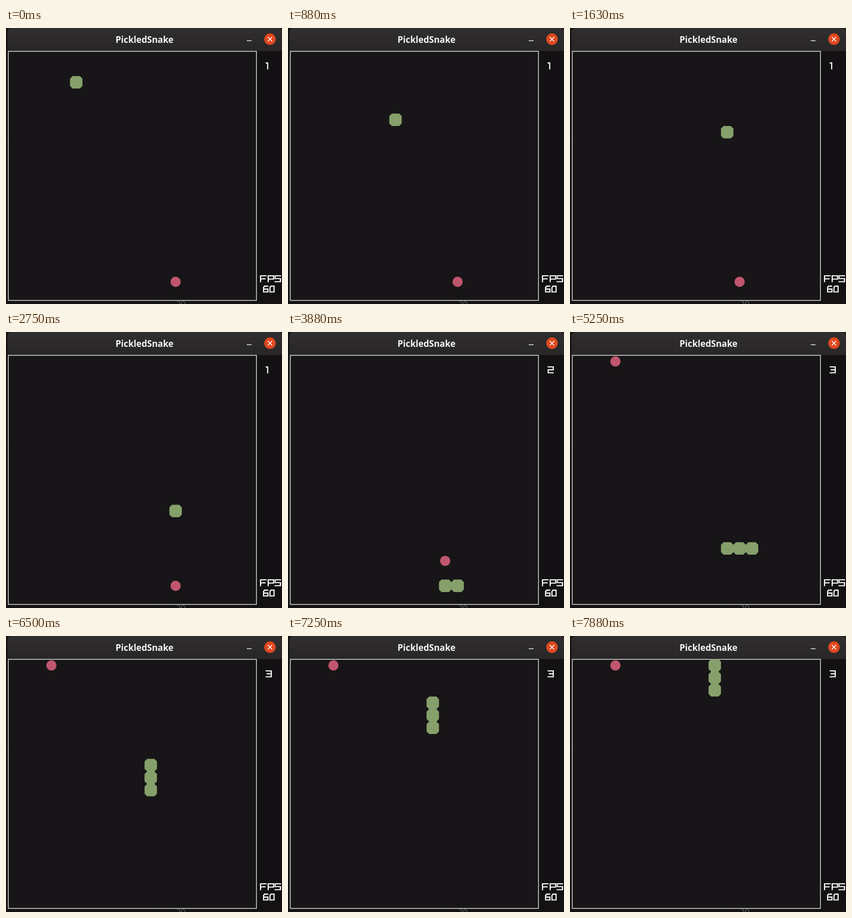
An HTML page that plays this animation: 540x538 px, repeating every 8000 ms.

```html
<!DOCTYPE html>
<html lang="en">
<head>
<meta charset="utf-8">
<title>PickledSnake</title>
<style>
  html, body { margin: 0; width: 100%; height: 100%; overflow: hidden; background: #151315; }
  svg { display: block; width: 100%; height: 100%; }
  text { font-family: "Open Sans", "Noto Sans", sans-serif; }
  .pixel { fill: none; stroke: #fff; stroke-width: 2.2; stroke-linecap: square; }
</style>
</head>
<body>
<svg viewBox="0 0 540 538">
  <defs>
    <linearGradient id="bar" x2="0" y2="1">
      <stop stop-color="#302e2f"/>
      <stop offset="1" stop-color="#282627"/>
    </linearGradient>
  </defs>
  <rect width="540" height="538" fill="#151214"/>
  <text x="-5" y="222" font-size="13" fill="#5b5747">s</text>
  <text x="333" y="544" font-size="16" fill="#5c5a5c">20</text>
  <path d="M300 532V538" stroke="#262326"/>
  <path d="M3 45V8Q3 0 11 0H532Q540 0 540 8V45Z" fill="url(#bar)"/>
  <rect x="490" y="45" width="50" height="487" fill="#131114"/>
  <rect x="4.5" y="45.5" width="485.5" height="485.5" fill="#171517" stroke="#f4f4f4" stroke-width="1.3"/>
  <text x="271" y="28.7" font-size="17.2" font-weight="700" text-anchor="middle" fill="#f5f5f3">PickledSnake</text>
  <path d="M471 24.7H480.5" stroke="#eee" stroke-width="1.4"/>
  <circle cx="516.5" cy="21.8" r="11.2" fill="#e0481f"/>
  <path d="M512.3 17.6l8.4 8.4m0-8.4l-8.4 8.4" stroke="#fff" stroke-width="1.5"/>
  <circle id="apple" r="10" fill="#bf566e"/>
  <path id="snake" fill="#86a06b"/>
  <path id="score" class="pixel"/>
  <path class="pixel" d="M498 494.5V483H509M498 489H507
    M513 494.5V483H523.5V489.5H513 M537 483H526.5V488.5H537V494.5H526.5
    M512 503.2H506L504 505.5V514.5H512.5V508.8H504 M518.5 503.2H524.5V514.5H516.5V505.5Z"/>
</svg>
<script>
const CELL = 24.3, LEFT = 3.8, TOP = 45.2, STEP = 125, LOOP = 8000;
const DIRS = { U: [0, -1], D: [0, 1], L: [-1, 0], R: [1, 0] };
// One letter per tick; a dot is a tick without a move.
const MOVES = "DDDRR.RRR.RRDD.DDRDD.DDD.DDDD.LLUU.RRRU.LLLU.UUUU.UUU.UUUU.UUU.";
const APPLES = [[13, 18], [12, 16], [3, 0]];
const DIGITS = [
  "M509 68.2H512V79.5",
  "M509 68H519V73.7H509V79.5H519",
  "M509 68H519V79.5H509M511 73.7H519"
];
const el = id => document.getElementById(id);
const octagon = ([c, r]) =>
  `M${LEFT + c * CELL + 5} ${TOP + r * CELL}h14.3l5 5v14.3l-5 5h-14.3l-5-5v-14.3z`;

function play(ticks) {
  let body = [[5, 2]], eaten = 0;
  for (const move of MOVES.slice(0, ticks)) {
    if (move === ".") continue;
    const [x, y] = body[0], [dx, dy] = DIRS[move];
    const head = [x + dx, y + dy];
    body.unshift(head);
    if (String(head) === String(APPLES[eaten])) eaten++;
    else body.pop();
  }
  return { body, eaten };
}

function draw(now) {
  const { body, eaten } = play(Math.floor(now % LOOP / STEP));
  const [c, r] = APPLES[eaten];
  el("snake").setAttribute("d", body.map(octagon).join(""));
  el("apple").setAttribute("cx", LEFT + (c + 0.5) * CELL);
  el("apple").setAttribute("cy", TOP + (r + 0.5) * CELL);
  el("score").setAttribute("d", DIGITS[eaten]);
}

const start = performance.now();
function frame() {
  draw(performance.now() - start);
  requestAnimationFrame(frame);
}
frame();
</script>
</body>
</html>
```
